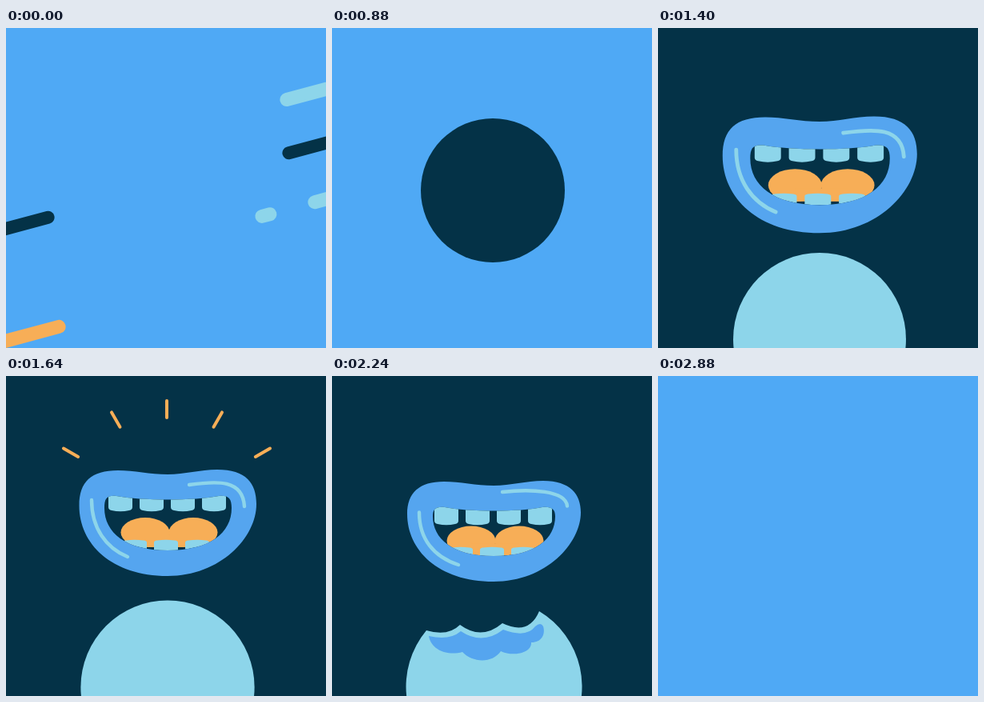
Write an HTML page that moves like this. It is 400x400 px and loops after 2920 ms.

```html
<!DOCTYPE html>
<html lang="en">
<head>
<meta charset="utf-8">
<title>Streaks and bite</title>
<style>
html, body { margin: 0; width: 100%; height: 100%; overflow: hidden; background: #4fa9f5; }
svg { display: block; width: 100vw; height: 100vh; }
</style>
</head>
<body>
<svg id="stage" viewBox="0 0 400 400"></svg>
<script>
const LOOP = 2920;
const SKY = '#4fa9f5', NAVY = '#043247', LIP = '#55a5ef', CYAN = '#8dd5ea', ORANGE = '#f7ae57';
const SPEED = 1.6, SLOPE = Math.tan(Math.PI / 12);
const MEET = 280;  // time at which streak positions are given
const BITE = 1960; // time at which the ball loses its top
const stage = document.getElementById('stage');

function el(tag, attrs, parent = stage) {
  const node = document.createElementNS('http://www.w3.org/2000/svg', tag);
  set(node, attrs);
  return parent.appendChild(node);
}
function set(node, attrs) {
  for (const key in attrs) node.setAttribute(key, attrs[key]);
}
const show = (node, on) => set(node, { display: on ? 'inline' : 'none' });
const repeat = (count, make) => Array.from({ length: count }, (_, i) => make(i));

const mix = (a, b, p) => a + (b - a) * p;
const ramp = (t, a, b) => Math.max(0, Math.min(1, (t - a) / (b - a)));
const ease = (t, a, b) => { const p = ramp(t, a, b); return p * p * (3 - 2 * p); };
const easeOut = (t, a, b) => 1 - (1 - ramp(t, a, b)) ** 3;
const backOut = (t, a, b) => { const q = ramp(t, a, b) - 1; return 1 + 2.7 * q ** 3 + 1.7 * q ** 2; };
const pulse = (t, a, b) => Math.sin(Math.PI * ramp(t, a, b)) ** 2;

el('rect', { width: 400, height: 400, fill: SKY });

// Streaks: x is horizontal, y is the height of the slanted line at x = 200
const streakLayer = el('g', {});
const streaks = [];

function slant(a, b, y, width, color, parent) {
  const at = x => y - (x - 200) * SLOPE;
  const x1 = Math.min(a, b) + width / 2, x2 = Math.max(a, b) - width / 2;
  return el('line', {
    x1, y1: at(x1), x2, y2: at(x2),
    stroke: color, 'stroke-width': width, 'stroke-linecap': 'round'
  }, parent);
}
function streak(y, dir, trailStart, trailLength) {
  const color = dir > 0 ? ORANGE : CYAN;
  const g = el('g', {}, streakLayer);
  repeat(3, i => slant(trailStart, trailStart - dir * trailLength * (1 - 0.13 * i * i),
    y + (i - 1) * 7.5, 2.2, color, g));
  streaks.push({ g, dir });
  return (a, b) => slant(a, b, y, 17, color, g);
}
function comet(y, dir, tail) {
  const bar = streak(y, dir, tail + dir * 8, 280);
  bar(tail, tail + dir * 247);
}
function dashes(bar, x, length, growth, gap, count) {
  for (let i = 0; i < count; i++, length += growth) {
    bar(x, x + length);
    x += length + gap;
  }
}

comet(1, -1, 117);
comet(130, -1, 143);
comet(398.3, -1, 213);
comet(337.5, 1, 274);
dashes(streak(60.2, 1, 400, 600), 65, 78, 16, 43, 3);
const mixed = streak(267.5, -1, -30, 670);
dashes(mixed, -135, 27, 37, 39, 2);
dashes(mixed, 53, 84, 4, 39, 3);

const darkBars = repeat(2, () => slant(0, 16, 197, 16, NAVY, streakLayer));
const dot = el('circle', { fill: NAVY });

// Night scene
const night = el('g', {});
const rings = repeat(3, i => {
  const r = 168 - 32 * i;
  return el('path', {
    d: `M202 ${388 + r}A${r} ${r} 0 0 1 202 ${388 - r}A${r} ${r} 0 0 1 202 ${388 + r}`,
    fill: 'none', stroke: i === 1 ? ORANGE : LIP, 'stroke-width': 4.6,
    'stroke-linecap': 'round', pathLength: 1
  }, night);
});
const rays = repeat(5, () => el('line', { stroke: ORANGE, 'stroke-width': 4, 'stroke-linecap': 'round' }, night));

const holeClip = el('path', {}, el('clipPath', { id: 'hole' }, night));
const inside = el('g', {}, night);
const insideClip = el('g', { 'clip-path': 'url(#hole)' }, inside);
const tongue = el('g', { fill: ORANGE }, insideClip);
repeat(2, i => el('ellipse', { cx: 174 + 60 * i, cy: 195.5, rx: 30.5, ry: 18.5 }, tongue));
el('rect', { x: 174, y: 199, width: 60, height: 15 }, tongue);
const lowerTeeth = el('g', { fill: CYAN }, insideClip);
repeat(3, i => el('path', {
  d: 'M0 208Q0 206 4 205.5Q15 204 26 205.5Q30 206 30 208V224H0Z',
  transform: `translate(${146 + 39 * i} 0)`
}, lowerTeeth));

const ball = el('circle', { cx: 202, fill: CYAN }, night);
const bitten = el('g', {}, night);
el('path', {
  d: 'M118 318Q145 326 160 311Q187 331 213 309Q246 325 259 294A110 110 0 1 1 118 318Z',
  fill: CYAN
}, bitten);
el('path', {
  d: 'M121 325Q147 331 161 319Q188 337 214 317Q243 328 254 313Q261 307 264 313C267 323 262 333 249 333' +
     'C250 347 225 351 211 344C200 360 175 358 163 345C145 350 124 343 121 325Z',
  fill: LIP
}, bitten);

const face = el('g', {}, night);
const lips = el('path', { fill: LIP, 'fill-rule': 'evenodd' }, face);
const upperClip = el('g', { 'clip-path': 'url(#hole)' }, face);
const upperTeeth = el('g', { fill: CYAN }, upperClip);
repeat(4, i => el('path', {
  d: 'M0 135H30V164Q30 167 26 168Q15 170.5 4 168Q0 167 0 164Z',
  transform: `translate(${128 + 39 * i} 0)`
}, upperTeeth));
const shine = el('path', { fill: 'none', stroke: CYAN, 'stroke-width': 4.4, 'stroke-linecap': 'round' }, face);

const flood = el('circle', { cx: 202, cy: 190, fill: SKY });

function drawStreaks(t) {
  show(streakLayer, t < 860);
  for (const { g, dir } of streaks) {
    const dx = dir * SPEED * (t - MEET);
    set(g, { transform: `translate(${dx} ${-dx * SLOPE})` });
  }
  // Two dark bars meet in the middle, then pull in to a dot
  const half = 210 * (1 - ramp(t, 250, 480)) + (t < 250 ? 30 : 0);
  const gap = Math.max(0, 152 - SPEED * t);
  darkBars.forEach((bar, i) => {
    const side = i ? 1 : -1;
    set(bar, {
      x1: 203 + side * gap, y1: 196.5 - side * gap * SLOPE,
      x2: 203 + side * half, y2: 196.5 - side * half * SLOPE
    });
  });
}

function drawDot(t) {
  show(dot, t >= 100);
  set(dot, {
    r: 8 + 82 * backOut(t, 480, 780) + 210 * ease(t, 890, 1000),
    cx: mix(203, 201, ramp(t, 480, 680)), cy: mix(196.5, 203, ramp(t, 480, 680))
  });
}

function drawRings(t) {
  rings.forEach((ring, i) => {
    const start = 921 + i * 24;
    const end = ramp(t, start, start + 200), begin = ramp(t, start + 240, start + 460);
    show(ring, end > begin);
    set(ring, { 'stroke-dasharray': `${end - begin} 2`, 'stroke-dashoffset': -begin });
  });
}

function drawRays(t) {
  const grow = ramp(t, 1480, 1600), fade = ramp(t, 1690, 1800);
  rays.forEach((ray, i) => {
    const angle = (i - 2) * Math.PI / 6;
    const outer = 134 + 30 * (1 - Math.cos(angle)), inner = outer - 21;
    const a = mix(inner, outer, grow), b = mix(inner, outer, fade);
    show(ray, grow > 0 && fade < 1);
    set(ray, {
      x1: 201 + a * Math.sin(angle), y1: 165 - a * Math.cos(angle),
      x2: 201 + b * Math.sin(angle), y2: 165 - b * Math.cos(angle)
    });
  });
}

function drawBall(t) {
  const grown = easeOut(t, 1130, 1480);
  set(ball, { r: 56 * ease(t, 1000, 1120) + 52.6 * grown, cy: 384 + 5 * grown });
  show(ball, t < BITE);
  show(bitten, t >= BITE);
}

function drawMouth(t) {
  const scale = backOut(t, 1240, 1500);
  const lunge = 110 * pulse(t, BITE - 240, BITE + 280);
  const gape = pulse(t, 1740, 1960), chomp = 22 * pulse(t, 1900, 2080);
  const chew = 15 * pulse((t - 2240) % 200, 0, 200) * (t > 2240 && t < 2640);
  const s = ease(t, BITE, 2240) * (1 - ease(t, 2480, 2640));
  // Shifts of the upper lip, the lower lip and the corners
  const u = 14 * s + lunge - 25 * gape + chomp + chew - 46 * ease(t, 2640, 2760);
  const l = 7 * s + lunge + 30 * gape - chomp;
  const m = (u + l) / 2;

  const L = 91.5 + 2.5 * s, R = 313 - 2 * s;
  const outer = `M${L} ${162 + m}C${L} ${132 + u} ${L + 15} ${118 + u} 140 ${118 + u}` +
    `C160 ${118 + u} 180 ${123 + u} 202 ${123 + u}C224 ${123 + u} 242 ${117 + u} 264 ${117 + u}` +
    `C${R - 13} ${117 + u} ${R} ${134 + u} ${R} ${160 + m}C${R} ${202 + l} 268 ${250 + l} 202 ${250 + l}` +
    `C132 ${250 + l} ${L} ${210 + l} ${L} ${162 + m}Z`;
  const a = 123 + 3 * s, b = 282 - 3 * s;
  const hole = `M${a} ${165 + m}C${a} ${153 + u} ${a + 3} ${149 + u} ${a + 15} ${150 + u}` +
    `C170 ${156 + u} 235 ${156 + u} ${b - 16} ${150 + u}C${b - 4} ${149 + u} ${b} ${153 + u} ${b} ${165 + m}` +
    `C${b} ${196 + l} 255 ${218 + l} 202 ${218 + l}C150 ${218 + l} ${a} ${196 + l} ${a} ${165 + m}Z`;
  set(lips, { d: outer + hole });
  set(holeClip, { d: hole });
  set(tongue, { transform: `translate(0 ${m})` });
  set(lowerTeeth, { transform: `translate(0 ${l + 2 * s})` });
  set(upperTeeth, { transform: `translate(0 ${u + 3 * s})` });

  const x = 107 + 2 * s, from = 229 - 16 * s, to = 298 - 4 * s;
  set(shine, {
    d: `M${x} ${155 + m + 5 * s}C${x} ${190 + m + 3 * s} ${x + 18} ${215 + l + 4 * s} ${152 + 6 * s} ${226 + l + 3 * s}` +
       `M${from} ${136 + u - 5 * s}C${from + 35} ${131 + u - 4 * s} ${to - 2} ${129 + u} ${to} ${163 + m - 11 * s}`
  });
  for (const node of [inside, face]) {
    set(node, { transform: `translate(202 185) scale(${scale}) translate(-202 -185)` });
    show(node, scale > 0.01);
  }
}

function draw(t) {
  drawStreaks(t);
  drawDot(t);
  show(night, t >= 900 && t < 2880);
  drawRings(t);
  drawRays(t);
  drawBall(t);
  drawMouth(t);
  show(flood, t > 2800);
  set(flood, { r: 300 * ramp(t, 2800, 2878) });
}

const began = performance.now();
function frame() {
  draw((performance.now() - began) % LOOP);
  requestAnimationFrame(frame);
}
frame();
</script>
</body>
</html>
```
